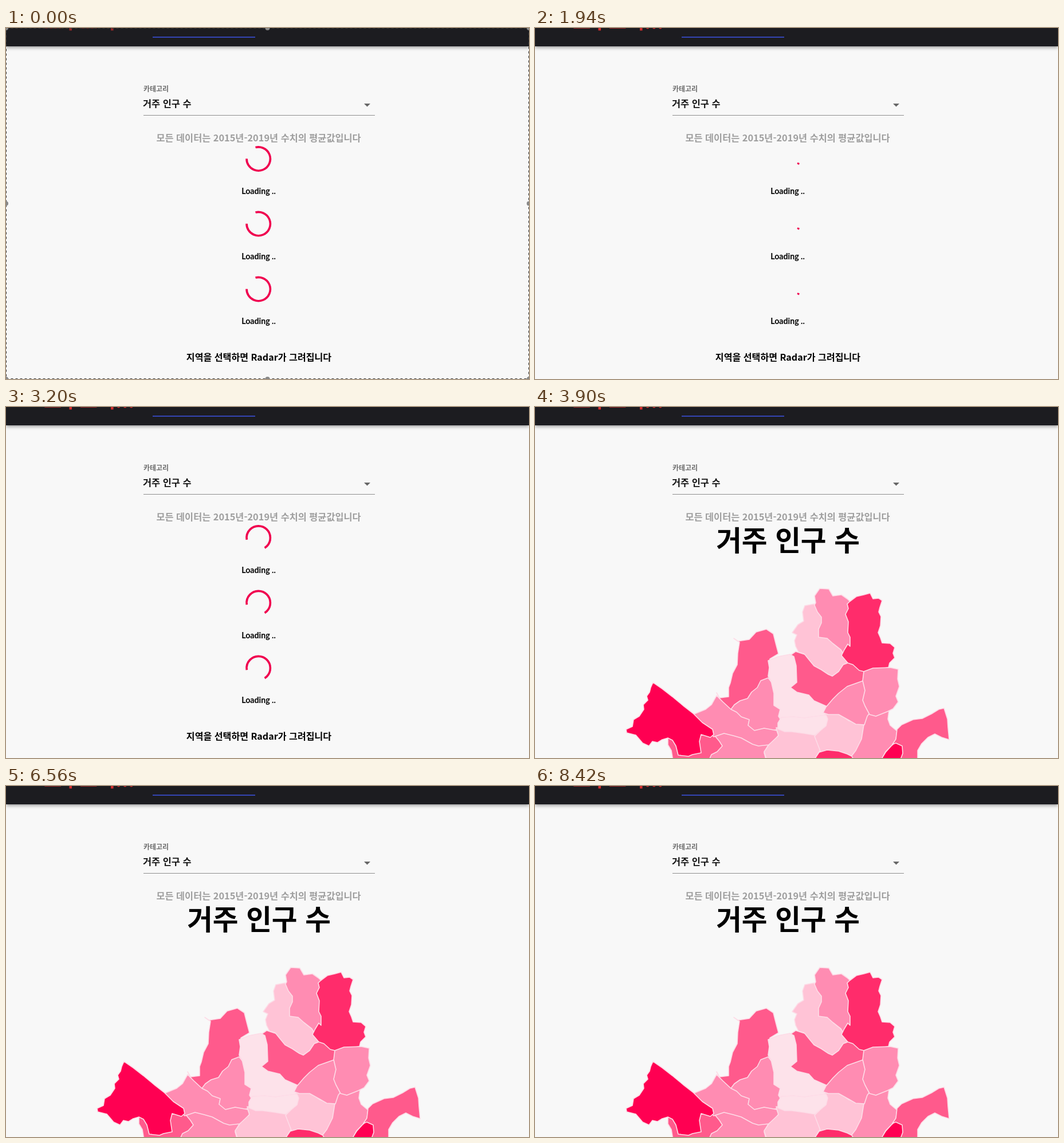
Write an HTML page that moves like this. It is 913x613 px and loops after 8.44 s.

```html
<!DOCTYPE html>
<html lang="ko">
<head>
<meta charset="utf-8">
<style>
  html, body { margin: 0; width: 100%; height: 100%; overflow: hidden; background: #f8f8f8; }
  header { position: absolute; top: 0; width: 100%; height: 32px; background: #1c1c20;
    box-shadow: 0 2px 4px -1px #0003, 0 4px 5px #0002, 0 1px 10px #0002; }
  svg { position: absolute; top: 0; left: 0; }
  text { font: 700 16px "Noto Sans CJK KR", "Noto Sans CJK", sans-serif; }
  .mid { text-anchor: middle; }
  .load { font: 700 14.2px Lato, sans-serif; text-anchor: middle; }
  #map path { stroke: #fddce7; stroke-width: 1.6; stroke-linejoin: round; }
  .a { fill: #fde2ea; }
  .b { fill: #ffc3d6; }
  .c { fill: #ff8cb2; }
  .d { fill: #ff5a8c; }
  .e { fill: #ff2c6b; }
  .f { fill: #ff0052; }
</style>
</head>
<body>
<header></header>
<svg width="913" height="613" viewBox="0 0 913 613">
  <text id="brand" x="66" y="1" fill="#d32f2f" style="font-size:34px; font-weight:900"></text>
  <path d="M256 16H435" stroke="#3445b4" stroke-width="2"/>
  <text x="240" y="111" fill="#6b6b6b" style="font-size:12px">카테고리</text>
  <text x="239" y="138" fill="#151515" style="font-size:16.4px">거주 인구 수</text>
  <path d="M625 132h11l-5.500 5.500z" fill="#666"/>
  <path d="M240 152.500H644" stroke="#8f8f8f"/>
  <text x="441" y="198" class="mid" fill="#9e9e9e" style="font-size:16.35px">모든 데이터는 2015년-2019년 수치의 평균값입니다</text>

  <g id="loading">
    <text x="441.500" y="581" class="mid" style="font-size:16.1px">지역을 선택하면 Radar가 그려집니다</text>
  </g>

  <g id="map">
    <text x="441.500" y="251" class="mid" style="font-size:48.600px; font-weight:900">거주 인구 수</text>
    <!-- later districts cover the shared edges of earlier ones -->
    <path class="d" d="M445 434L455 427 480 435 520 455 545 440 582 460 578 484 545 495 510 530 480 515 446 500z"/>
    <path class="c" d="M490 342L488 330 497 317 513 318 520 330 535 328 545 335 556 345 556 420 540 432 490 407 485 350z"/>
    <path class="b" d="M471 347L487 344 493 358 500 367 500 377 495 388 495 402 510 404 520 413 534 424 540 434 546 447 538 450 530 462 519 470 512 467 500 459 487 452 478 441 470 431 460 428 455 418 453 408 457 398 449 394 459 380 469 374 467 358z"/>
    <path class="e" d="M549 340L561 331 574 328 585 325 590 335 600 334 606 338 602 350 600 358 604 366 603 382 599 394 603 403 606 412 620 413 628 420 625 430 628 438 619 447 617 455 594 458 574 462 566 460 555 450 546 447 535 434 540 424 546 414 550 418 550 402 546 394 547 375 542 362 547 352 545 344z"/>
    <path class="d" d="M347 404L354 409 374 406 386 393 404 388 416 396 420 412 425 431 410 440 414 478 350 535 328 520 317 499 322 508 338 506 338 490 341 482 345 465 353 450 354 430 357 411z"/>
    <path class="c" d="M407 473L420 490 432 525 432 560 400 570 370 565 342 528 348 520 358 513 371 509 378 498 388 490 394 478z"/>
    <path class="a" d="M407 443L424 436 445 432 452 436 456 452 457 481 446 490 457 498 478 503 487 513 512 524 512 545 430 548 425 540 428 528 417 521 417 500 412 478 407 470 409 455z"/>
    <path class="c" d="M300 570L360 570 410 585 400 604 404 618H300z"/>
    <path class="d" d="M232 575L312 572 322 584 327 592 318 602 308 607 303 618H241L238 600 232 590z"/>
    <path class="c" d="M317 504L328 515 342 528 352 533 360 541 374 546 372 556 383 565 400 561 422 565 425 573 420 580 408 590 390 592 380 589 360 578 346 574 330 570 312 576 295 560 276 537 298 528 308 520z"/>
    <path class="f" d="M206 481L222 492 240 506 258 521 276 535 292 551 310 563 312 572 306 577 290 572 287 584 290 604 275 607 268 610 250 608 246 592 240 582 232 578 222 581 214 586 205 584 199 592 188 587 176 573 160 569 159 563 170 558 172 546 182 540 190 528 189 520 197 512 195 505 200 498 202 490z"/>
    <path class="b" d="M421 560L490 565 503 592 494 605 488 618H405L400 602 408 590 425 574z"/>
    <path class="c" d="M578 537L618 530 616 545 620 556 632 566 630 582 622 592 612 602 604 618H552L555 560z"/>
    <path class="b" d="M508 532L530 534 548 548 574 555 570 580 560 600 553 609 540 610 500 606 488 575 497 566z"/>
    <path class="e" d="M486 618L496 603 510 599 530 601 545 606 553 610 558 618z"/>
    <path class="a" d="M430 542L452 541 470 543 490 540 508 538 511 545 508 557 497 566 488 573 470 570 448 567 436 567 424 562 424 552z"/>
    <path class="c" d="M508 524L520 510 530 500 545 488 576 477 580 505 586 532 580 540 575 555 560 554 548 547 530 537 512 537 503 534z"/>
    <path class="c" d="M574 462L590 456 620 455 634 458 633 475 636 488 630 505 634 515 625 527 615 532 595 540 584 537 576 522 572 512 576 495 572 478z"/>
    <path class="f" d="M603 618L612 603 622 592 630 585 645 590 645 618z"/>
    <path class="d" d="M632 563L640 555 660 546 676 544 692 536 705 528 714 526 720 545 721 560 723 581 710 577 698 571 686 577 675 588 668 600 668 618H637L642 605 641 592 630 587 624 589 630 580z"/>
  </g>

  <g id="selection" fill="#888">
    <rect x=".5" y=".5" width="912" height="612" fill="none" stroke="#333" stroke-dasharray="4 4"/>
  </g>
</svg>
<script>
const LOOP = 8440, SPIN = 1400, MAP_STEP = 80;
const $ = id => document.getElementById(id);

function add(parent, tag, attrs, text = '') {
  const node = document.createElementNS('http://www.w3.org/2000/svg', tag);
  for (const key in attrs) node.setAttribute(key, attrs[key]);
  node.textContent = text;
  return parent.appendChild(node);
}

const rings = [228.5, 342, 456].map((cy, i) => {
  add($('loading'), 'text', { x: 441, y: [290, 404, 517][i], class: 'load' }, 'Loading ..');
  const place = add($('loading'), 'g', { transform: `translate(440.7 ${cy}) scale(1.023)` });
  return add(place, 'circle', { r: 20.2, fill: 'none', stroke: '#f0004f', 'stroke-width': 3.6 });
});

for (const x of [0, 456.5, 913])
  for (const y of [0, 306.5, 613])
    if (x !== 456.5 || y !== 306.5) add($('selection'), 'circle', { cx: x, cy: y, r: 4 });

// cubic-bezier(.42, 0, .58, 1)
function easeInOut(x) {
  let lo = 0, hi = 1, s;
  for (let i = 0; i < 20; i++) {
    s = (lo + hi) / 2;
    const bx = 3 * (1 - s) * s * (.42 * (1 - s) + .58 * s) + s ** 3;
    if (bx < x) lo = s; else hi = s;
  }
  return s * s * (3 - 2 * s);
}

function stepAt(t) {
  const r = t % 140;
  return 3 * Math.floor(t / 140) + (r >= 20) + (r >= 120);
}

function show(id, on) { $(id).style.display = on ? '' : 'none'; }

function draw() {
  const step = stepAt(performance.now() % LOOP);
  const phase = (788 + step * 1000 / 60) % SPIN / SPIN;
  const half = easeInOut(phase * 2 % 1);
  const [dash, offset] = phase < .5 ? [1 + 99 * half, -15 * half] : [100, -15 - 110 * half];
  for (const ring of rings) {
    ring.setAttribute('transform', `rotate(${phase * 360})`);
    ring.setAttribute('stroke-dasharray', `${dash} 200`);
    ring.setAttribute('stroke-dashoffset', offset);
  }
  show('loading', step < MAP_STEP);
  show('map', step >= MAP_STEP);
  show('selection', step === 0);
  $('brand').textContent = step ? '모두모여...' : '모두모여';
  $('brand').setAttribute('opacity', step ? 1 : .65);
  requestAnimationFrame(draw);
}
draw();
</script>
</body>
</html>
```
